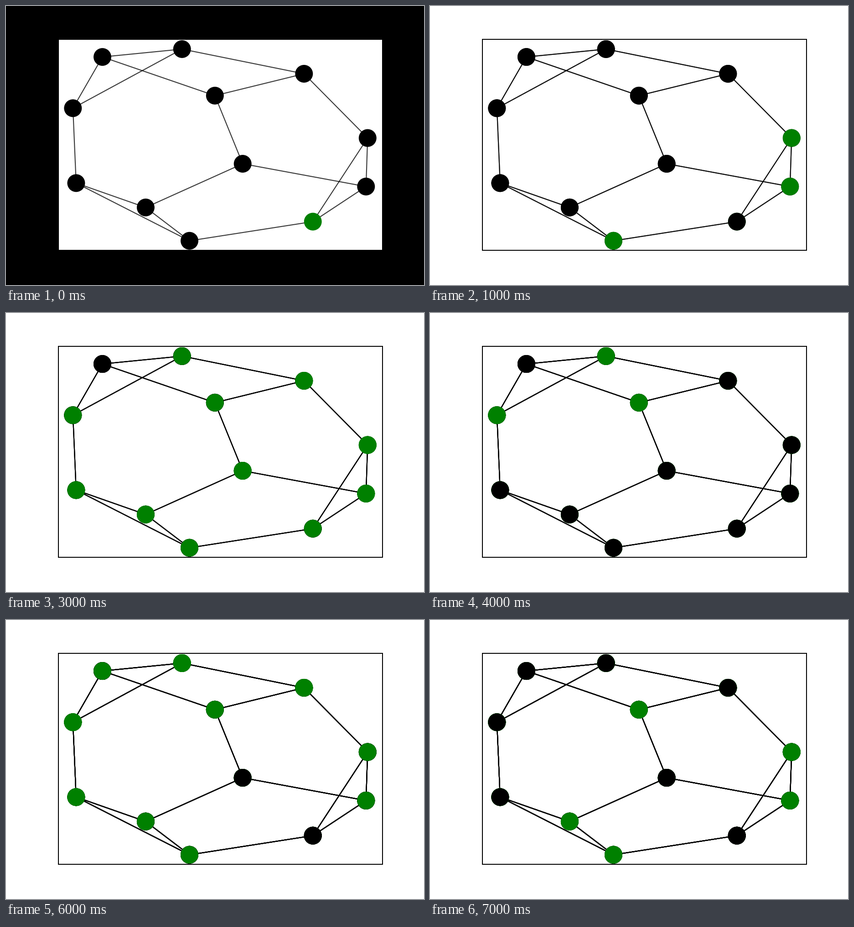
A matplotlib script that plays this animation: 917x611 px, repeating every 8 s.

```python
import matplotlib.pyplot as plt
from matplotlib.animation import FuncAnimation
from matplotlib.collections import LineCollection
from matplotlib.patches import Rectangle

W, H = 917, 611
DPI = 64
PT = 72 / DPI            # points per pixel
UNIT = W / 6 / 72        # pixels per point of a six inch wide drawing
STEPS = 8

NODES = {
    "A": (211.5, 111.6), "B": (386.2, 94.4), "C": (653.8, 148.4),
    "D": (458.3, 196.3), "E": (146.8, 223.8), "F": (793.3, 289.1),
    "G": (519.2, 345.5), "H": (789.8, 395.4), "I": (153.9, 387.8),
    "J": (306.4, 441.2), "K": (402.5, 514.2), "L": (673.2, 472.2),
}
EDGES = "AB AD AE BC BE CD CF DG EI FH FL GH GJ HL IJ IK JK KL".split()
NEIGHBOURS = {n: [e.replace(n, "") for e in EDGES if n in e] for n in NODES}


def advance(lit):
    """A node lights up when its neighbours are not all alike."""
    return {n for n, near in NEIGHBOURS.items()
            if 0 < sum(m in lit for m in near) < len(near)}


def box(x0, y0, x1, y1, color, z):
    return ax.add_patch(Rectangle((x0, y0), x1 - x0, y1 - y0,
                                  fc=color, lw=0, zorder=z))


fig = plt.figure(figsize=(W / DPI, H / DPI), dpi=DPI)
ax = fig.add_axes([0, 0, 1, 1])
ax.set(xlim=(0, W), ylim=(H, 0))
ax.axis("off")

page = box(0, 0, W, H, "white", 0)
box(114, 72, 827, 536, "black", 0.1)
box(116, 74, 825, 534, "white", 0.2)

# Each step paints over the earlier ones, so the edges darken with time.
segments = [[NODES[a], NODES[b]] for a, b in EDGES]
xs, ys = zip(*NODES.values())
layers = []
lit = {"L"}
for step in range(STEPS):
    lines = LineCollection(segments, colors="black", alpha=0.78,
                           linewidths=UNIT * PT, zorder=1)
    ax.add_collection(lines, autolim=False)
    colors = ["green" if n in lit else "black" for n in NODES]
    dots = ax.scatter(xs, ys, s=300 * (UNIT * PT) ** 2, c=colors,
                      edgecolors=colors, linewidths=UNIT * PT, zorder=2)
    layers.append((lines, dots))
    lit = advance(lit)
ax.set(xlim=(0, W), ylim=(H, 0))


def update(frame):
    page.set_facecolor("black" if frame == 0 else "white")
    for step, layer in enumerate(layers):
        for artist in layer:
            artist.set_visible(step <= frame)
    return []


anim = FuncAnimation(fig, update, frames=STEPS, interval=1000,
                     repeat=True, repeat_delay=0, blit=False)
plt.show()
```
